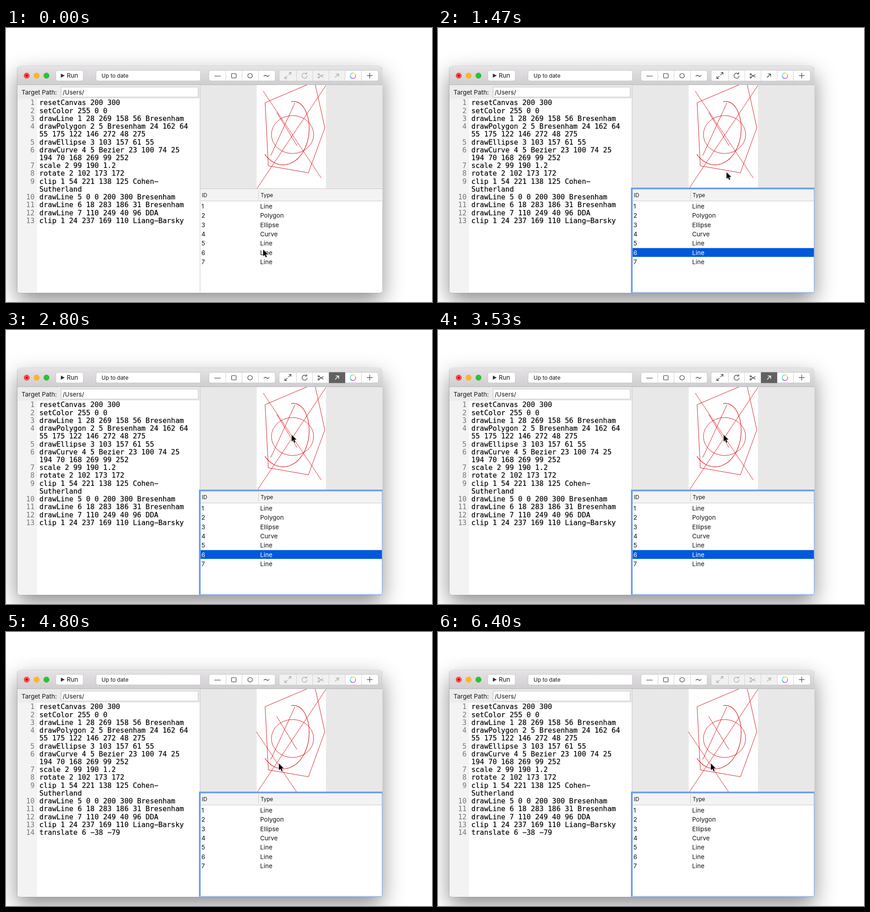
These frames come from a looping animation (932x601 px, 6470 ms). An HTML page:

```html
<!DOCTYPE html>
<html lang="en">
<head>
<meta charset="utf-8">
<title>Drawing editor</title>
<style>
  html, body { margin: 0; width: 100%; height: 100%; overflow: hidden; background: #fff; }
  .window {
    position: absolute; left: 25px; top: 84px; width: 798px; height: 496.5px; border-radius: 5px;
    box-shadow: 0 0 0 .6px rgba(0,0,0,.25), 0 18px 48px rgba(0,0,0,.45);
  }
  svg { position: absolute; left: 0; top: 0; width: 932px; height: 601px; }
  text { font: 13.5px Inter, sans-serif; fill: #141414; white-space: pre; }
  .small { font-size: 12px; }
  .head { font-size: 11.7px; }
  .code text { font: 15.45px "DejaVu Sans Mono", monospace; fill: #000; stroke: #000; stroke-width: .2; }
  .code .num { fill: #777; stroke: none; text-anchor: end; }
  .button { fill: #fff; stroke: #bdbbbd; stroke-width: .8; }
  .icon { fill: none; stroke: currentColor; stroke-width: 1.1; color: #2d2d2d; }
  .shapes { fill: none; stroke: #d8181f; stroke-width: 1.3; }
  .selected text { fill: #fff; }

  .icon.edit, .editBack, .picked, .armed, .before, .after, .drag {
    animation: 6470ms step-end infinite;
  }
  .icon.edit { animation-name: enable; }
  .editBack { animation-name: whiten; }
  .picked { animation-name: picked; }
  .armed { animation-name: armed; }
  .before { animation-name: before; }
  .after { animation-name: after; }
  .drag { animation-name: drag; }
  .ring { fill: none; stroke: #6b9eee; animation: ring 6470ms linear infinite; }
  .cursor { animation: move 6470ms ease-in-out infinite; }
  .trail { stroke-dasharray: 1; animation: trail 6470ms ease-in-out infinite; }

  /* 800 ms pick, 2270 ms arm, 3800 ms drag, 4800 ms release */
  @keyframes enable { 0% { color: #a0a0a0 } 12.365% { color: #2d2d2d } 74.19%, to { color: #a0a0a0 } }
  @keyframes whiten { 0% { fill: #f2f1f2 } 12.365% { fill: #fff } 74.19%, to { fill: #f2f1f2 } }
  @keyframes picked { 0% { opacity: 0 } 12.365% { opacity: 1 } 74.19%, to { opacity: 0 } }
  @keyframes armed { 0% { opacity: 0 } 35.09% { opacity: 1 } 74.19%, to { opacity: 0 } }
  @keyframes drag { 0% { opacity: 0 } 58.8% { opacity: 1 } 74.19%, to { opacity: 0 } }
  @keyframes before { 0% { opacity: 1 } 74.19%, to { opacity: 0 } }
  @keyframes after { 0% { opacity: 0 } 74.19%, to { opacity: 1 } }
  @keyframes ring {
    0%, 12.365% { opacity: 0; stroke-width: 19px }
    15.456%, to { opacity: 1; stroke-width: 7.4px }
  }
  @keyframes move {
    0%, 16.54% { transform: translate(562.5px, 486px) }
    29.83%, 36.01% { transform: translate(718px, 102px) }
    42.04%, 58.73% { transform: translate(625px, 230px) }
    70.48%, to { transform: translate(597px, 288.5px) }
  }
  @keyframes trail {
    0%, 58.73% { stroke-dashoffset: 1 }
    70.48%, to { stroke-dashoffset: 0 }
  }
</style>
</head>
<body>
<div class="window"></div>
<svg viewBox="0 0 932 601">
  <defs>
    <linearGradient id="bar" x2="0" y2="1">
      <stop stop-color="#e5e3e5"/><stop offset="1" stop-color="#cfcdcf"/>
    </linearGradient>
    <clipPath id="frame"><rect x="25" y="84" width="798.5" height="496.5" rx="5"/></clipPath>
    <clipPath id="page"><rect x="548.4" y="125" width="151.6" height="227"/></clipPath>
  </defs>

  <g clip-path="url(#frame)">
    <rect x="25" y="84" width="799" height="497" fill="#fff"/>
    <rect x="25" y="84" width="799" height="41" fill="url(#bar)"/>
    <path d="M25 84.5H823" stroke="#f3f2f3"/>
    <path d="M25 124.5H823" stroke="#b7b5b7"/>

    <!-- editor -->
    <rect x="25" y="125" width="399" height="30" fill="#ececec"/>
    <rect x="25" y="155" width="43" height="426" fill="#f3f3f3"/>
    <rect x="120.5" y="129.5" width="300" height="22" fill="#fff" stroke="#bcbcbc"/>
    <text x="34" y="145.5">Target Path:</text>
    <text x="124" y="145.5">/Users/</text>
    <g class="code" id="code"></g>

    <!-- drawing -->
    <rect x="424" y="125" width="400" height="228" fill="#e8e8e8"/>
    <path d="M424.5 125V581" stroke="#c6c6c6"/>
    <g clip-path="url(#page)">
      <rect x="548" y="125" width="152" height="227" fill="#fff"/>
      <g class="shapes" transform="translate(548.9 352.5) scale(.757 -.757)">
        <path d="M57.3 221 115.9 125M0 0 200 300M110 249 40 96"/>
        <path d="M196.4 176.5 166.7 310.3 23.7 249.3 33.1 66.2 149 46.2Z"/>
        <ellipse cx="103" cy="157" rx="61" ry="55"/>
        <path id="curve" stroke-width="1.55"/>
        <path class="before" d="M18 283 186 31"/>
        <path class="after" d="M-20 204 148 -48"/>
      </g>
    </g>

    <!-- table, covering the inner half of its focus ring -->
    <path d="M424 352.5H824" stroke="#c6c6c6"/>
    <rect x="425" y="353" width="399" height="27" fill="#f3f3f3"/>
    <rect class="ring" x="425.8" y="353.8" width="396.6" height="225.6"/>
    <g id="table"></g>
  </g>

  <!-- title bar -->
  <circle cx="45.3" cy="104.5" r="6.5" fill="#fc4a49"/>
  <circle cx="45.3" cy="104.5" r="2.1" fill="#7a0605"/>
  <circle cx="67" cy="104.5" r="6.5" fill="#fdb42a"/>
  <circle cx="88.5" cy="104.5" r="6.5" fill="#29c237"/>
  <rect class="button" x="109" y="93" width="60" height="23" rx="4"/>
  <path d="M120 100V109L128.5 104.5Z" fill="#333"/>
  <text x="133" y="109.3">Run</text>
  <rect class="button" x="197" y="93" width="228.5" height="23" rx="4"/>
  <text class="small" x="209" y="109">Up to date</text>

  <rect class="button" x="444" y="93" width="145" height="23" rx="4"/>
  <rect class="button" x="598" y="93" width="216.5" height="23" rx="4"/>
  <path class="editBack" d="M742 93.4H602Q598.4 93.4 598.4 97V112Q598.4 115.6 602 115.6H742Z"/>
  <path d="M481 93V116M516.5 93V116M552.5 93V116M635.5 93V116M671 93V116M706.5 93V116M742 93V116M777.5 93V116" stroke="#d2d0d2"/>
  <g class="icon">
    <path d="M456 105.5H469.5M789.5 104.5H802M795.75 98.2V110.7"/>
    <rect x="493.5" y="100" width="10" height="9.5" rx="1.5"/>
    <circle cx="534" cy="104.7" r="5"/>
    <path d="M564 106.2C566 102.5 568 103.5 570 105S574 107 576 103.5"/>
  </g>
  <g class="icon edit">
    <path d="M618.5 97.5H623.5V102.5M623.5 97.5 617.8 103.2M615 111H610V106M610 111 615.7 105.3"/>
    <path d="M657 100.5A5.6 5.6 0 1 0 658.8 104.5M653.8 101H658V96.8"/>
    <path d="M685 102.3 694.5 108M685 107.7 694.5 102"/>
    <circle cx="684" cy="101.6" r="1.5"/><circle cx="684" cy="108.4" r="1.5"/>
    <path d="M720 108.5 727.5 101M721.5 100.7H727.8V107"/>
  </g>
  <g class="armed">
    <rect x="706.5" y="92.6" width="35.5" height="23.8" fill="#626162"/>
    <path d="M720 108.5 727.5 101M721.5 100.7H727.8V107" fill="none" stroke="#fff" stroke-width="1.5"/>
  </g>
  <g id="wheel" fill="none" stroke-width="1.6"></g>

  <g class="drag" fill="none" stroke="#000" stroke-width="1.4">
    <path class="trail" pathLength="1" d="M625 230 597 288.5"/>
    <path class="cursor" d="M4.3 -2.5 0 0 -.8 -4.9"/>
  </g>
  <path class="cursor" d="M0 0V14.7L3.4 11.5 5.7 17 8.2 15.9 5.9 10.6H10.6Z" stroke="#fff" stroke-width="1.3" paint-order="stroke"/>
</svg>
<script>
  const byId = id => document.getElementById(id);
  const label = (x, y, value, cls = '') => `<text x="${x}" y="${y}" class="${cls}">${value}</text>`;

  // A line break is a soft wrap within one numbered command.
  const commands = [
    'resetCanvas 200 300', 'setColor 255 0 0', 'drawLine 1 28 269 158 56 Bresenham',
    'drawPolygon 2 5 Bresenham 24 162 64\n55 175 122 146 272 48 275',
    'drawEllipse 3 103 157 61 55',
    'drawCurve 4 5 Bezier 23 100 74 25\n194 70 168 269 99 252',
    'scale 2 99 190 1.2', 'rotate 2 102 173 172', 'clip 1 54 221 138 125 Cohen−\nSutherland',
    'drawLine 5 0 0 200 300 Bresenham', 'drawLine 6 18 283 186 31 Bresenham',
    'drawLine 7 110 249 40 96 DDA', 'clip 1 24 237 169 110 Liang−Barsky', 'translate 6 −38 −79'
  ];
  let baseline = 169.3;
  byId('code').innerHTML = commands.map((command, i) => {
    let out = label(62.5, baseline, i + 1, 'num');
    for (const line of command.split('\n')) {
      out += label(73, baseline, line);
      baseline += 17.24;
    }
    return `<g class="${i === 13 ? 'after' : ''}">${out}</g>`;
  }).join('');

  const row = (type, i) => {
    const y = 395.7 + i * 20.43;
    return label(427.5, y, i + 1) + label(556, y, type);
  };
  const types = ['Line', 'Polygon', 'Ellipse', 'Curve', 'Line', 'Line', 'Line'];
  const box = (y, height, fill) => `<rect x="425.8" y="${y}" width="396.6" height="${height}" fill="${fill}"/>`;
  byId('table').innerHTML =
    box(353.8, 26.2, '#f3f3f3') + box(380, 199.4, '#fff') +
    '<path d="M425.8 379.5H822.4M552.5 357V376" stroke="#cacaca"/>' +
    label(428.5, 370.8, 'ID', 'head') + label(557, 370.8, 'Type', 'head') +
    types.map(row).join('') +
    `<g class="picked selected">${box(482.7, 19.3, '#0058dc')}${row('Line', 5)}</g>`;

  // Quartic Bezier by repeated interpolation.
  const control = [[23, 100], [74, 25], [194, 70], [168, 269], [99, 252]];
  const bezier = (points, t) => points.length === 1 ? points[0] : bezier(
    points.slice(1).map((p, i) => p.map((v, k) => points[i][k] * (1 - t) + v * t)), t);
  byId('curve').setAttribute('d', 'M' + Array.from({ length: 61 }, (_, i) => bezier(control, i / 60)).join('L'));

  const onWheel = a => [759 + 6 * Math.cos(a), 104.6 + 6 * Math.sin(a)];
  byId('wheel').innerHTML = Array.from({ length: 24 }, (_, i) => {
    const a = i * Math.PI / 12;
    return `<path d="M${onWheel(a)}A6 6 0 0 1 ${onWheel(a + .29)}" stroke="hsl(${360 - i * 15} 80% 64%)"/>`;
  }).join('');
</script>
</body>
</html>
```
